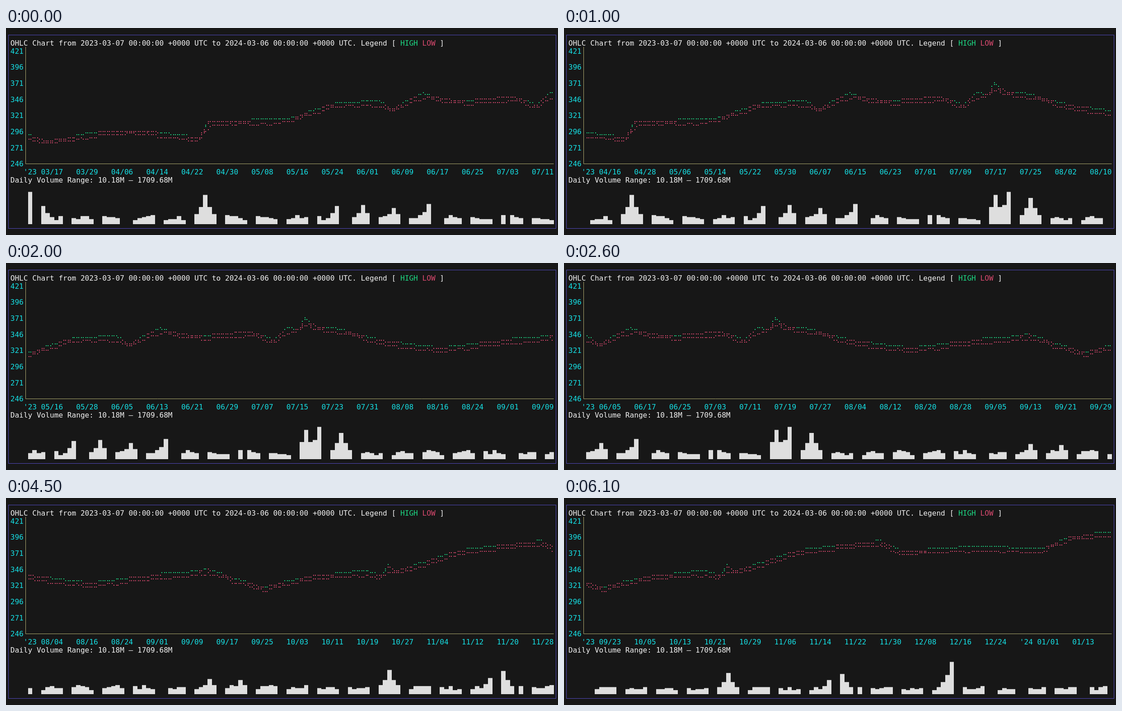
Write an HTML page with a canvas that moves like this. It is 1222 by 458 pixels and loops after 6500 ms.

```html
<!DOCTYPE html>
<html lang="en">
<head>
<meta charset="utf-8">
<title>OHLC chart</title>
<style>
html, body { margin: 0; height: 100%; overflow: hidden; background: #171717; }
canvas { display: block; }
</style>
</head>
<body>
<canvas id="stage" width="1222" height="458"></canvas>
<script>
const ctx = document.getElementById('stage').getContext('2d');

// Terminal grid
const CELL_W = 9.7, CELL_H = 17.85, LEFT = 9.7;
const WINDOW = 120, DAYS = 312, PLOT_COL = 4, AXIS_COL = 3, AXIS_ROW = 15;
const colX = col => LEFT + col * CELL_W;
const rowY = row => 32.8 + row * CELL_H;

const WHITE = '#f2f2f2', CYAN = '#16dfe4', GREEN = '#1dd683', RED = '#dc4a70';
const AXIS = '#b0ad70', BORDER = '#524bc0', BAR = '#dedede';

// Loop timing: every step scrolls ten days
const LOOP = 6500;
const STEPS = [300, 600, 1000, 1300, 1600, 2000, 2300, 2600, 3000, 3300,
  3500, 3900, 4200, 4500, 4900, 5200, 5400, 5800, 6100];

// Turning points of the daily high: [days since 2023-03-17, dot row from the top]
const TURNS = [
  [0, 43], [4, 46], [16, 41], [27, 41], [39, 44], [41, 36], [59, 35], [70, 27],
  [80, 26], [83, 30], [90, 22], [98, 26], [111, 24], [116, 28], [119, 22], [122, 23],
  [123, 17], [126, 22], [130, 22], [140, 28], [154, 32], [161, 30], [181, 25],
  [193, 34], [203, 29], [216, 26], [221, 28], [222, 23], [224, 26], [238, 16],
  [257, 11], [262, 16], [280, 14], [294, 15], [300, 9], [311, 6]
];
// Busy days: [day, volume in eighths of a text row]
const BURSTS = [
  [0, 32], [3, 18], [40, 29], [70, 18], [76, 19], [83, 16], [91, 20], [123, 29],
  [126, 32], [131, 26], [181, 15], [188, 14], [222, 24], [245, 16], [248, 23], [273, 37]
];
const HOLIDAYS = [21, 73, 94, 109, 171, 251, 283, 290, 304];

const isOpen = day => (day + 4) % 7 < 5 && !HOLIDAYS.includes(day);
const noise = n => {
  const x = Math.sin(n * 12.9898) * 43758.5453;
  return x - Math.floor(x);
};

function highOn(day) {
  const d = Math.min(Math.max(day, 0), DAYS - 1);
  const i = Math.max(1, TURNS.findIndex(([turn]) => turn >= d));
  const [d0, v0] = TURNS[i - 1], [d1, v1] = TURNS[i];
  return v0 + (v1 - v0) * (d - d0) / (d1 - d0);
}

// The low trails a smoothed high by a varying gap
function lowOn(day) {
  const mean = (highOn(day - 1) + highOn(day) + highOn(day + 1)) / 3;
  return mean + 1.3 + 1.2 * noise(day);
}

// Quiet trade with bursts that build up and fade by the day
function volumeOn(day) {
  if (!isOpen(day)) return 0;
  const bursts = BURSTS.map(([peak, size]) => size * 0.6 ** Math.abs(day - peak));
  return Math.max(4 + 5 * noise(day + 400), ...bursts);
}

// Braille cells per day; a later series recolours a cell it shares
const cells = Array.from({ length: DAYS }, () => ({}));
function plot(valueOn, color) {
  const days = cells.map((_, day) => day).filter(isOpen);
  const points = days.map(day => [day, Math.round(valueOn(day))]);
  points.push([DAYS - 1, Math.round(valueOn(DAYS - 1))]);
  for (let i = 1; i < points.length; i++) {
    const [d0, v0] = points[i - 1], [d1, v1] = points[i];
    const steps = Math.max(2 * (d1 - d0), Math.abs(v1 - v0));
    for (let s = 0; s < steps; s++) {
      const x = Math.round(2 * (d0 + (d1 - d0) * s / steps));
      const y = Math.round(v0 + (v1 - v0) * s / steps);
      const cell = cells[x >> 1][y >> 2] ||= { dots: new Set() };
      cell.dots.add((y & 3) * 2 + (x & 1));
      cell.color = color;
    }
  }
}
plot(highOn, GREEN);
plot(lowOn, RED);

function text(string, col, row, color) {
  ctx.fillStyle = color;
  ctx.fillText(string, colX(col), rowY(row) + 5.9);
}

function drawFrame() {
  ctx.fillStyle = '#171717';
  ctx.fillRect(0, 0, 1222, 458);
  ctx.font = '16.11px "DejaVu Sans Mono", monospace';
  ctx.lineWidth = 1;
  ctx.strokeStyle = BORDER;
  ctx.strokeRect(5.5, 15.5, 1212, 428);

  text('OHLC Chart from 2023-03-07 00:00:00 +0000 UTC to 2024-03-06 00:00:00 +0000 UTC. Legend [', 0, 0, WHITE);
  text('HIGH', 89, 0, GREEN);
  text('LOW', 94, 0, RED);
  text(']', 98, 0, WHITE);
  text('Daily Volume Range: 10.18M – 1709.68M', 0, 17, WHITE);

  for (let row = 1; row <= AXIS_ROW; row += 2) {
    text(String(421 - (row - 1) * 12.5), 0, row, CYAN);
  }
  ctx.strokeStyle = AXIS;
  ctx.beginPath();
  ctx.moveTo(43.5, rowY(0.5));
  ctx.lineTo(43.5, 300.5);
  ctx.lineTo(colX(PLOT_COL + WINDOW), 300.5);
  ctx.stroke();
}

function drawDates(start) {
  let shownYear = '';
  for (let col = 0; col < WINDOW;) {
    const date = new Date(Date.UTC(2023, 2, 17 + start + col)).toISOString();
    const year = date.slice(2, 4);
    let label = date.slice(5, 10).replace('-', '/');
    if (year !== shownYear) label = `'${year} ${label}`;
    shownYear = year;
    if (col + label.length <= WINDOW + 1) text(label, AXIS_COL + col, 16, CYAN);
    col += label.length > 5 ? 12 : 8;
  }
}

function drawDots(column, x) {
  for (const [row, { dots, color }] of Object.entries(column)) {
    ctx.fillStyle = color;
    for (const dot of dots) {
      const dx = x + 1.1 + (dot & 1) * 3.9;
      const dy = rowY(+row + 1) - 5.5 + (dot >> 1) * 3.87;
      ctx.fillRect(Math.round(dx), Math.round(dy), 2, 2);
    }
  }
}

function draw() {
  const time = performance.now() % LOOP;
  const start = 10 * STEPS.filter(step => step <= time).length;
  const peak = start >= 160 ? 37 : 32; // largest volume seen so far

  drawFrame();
  drawDates(start);
  for (let i = 0; i < WINDOW; i++) {
    const left = colX(PLOT_COL + i);
    drawDots(cells[start + i], left);
    const x = Math.round(left), right = Math.round(colX(PLOT_COL + i + 1));
    const height = Math.round(volumeOn(start + i) * 32 / peak) * CELL_H / 8;
    ctx.fillStyle = BAR;
    ctx.fillRect(x, 434 - height, right - x, height);
  }
  requestAnimationFrame(draw);
}
draw();
</script>
</body>
</html>
```
